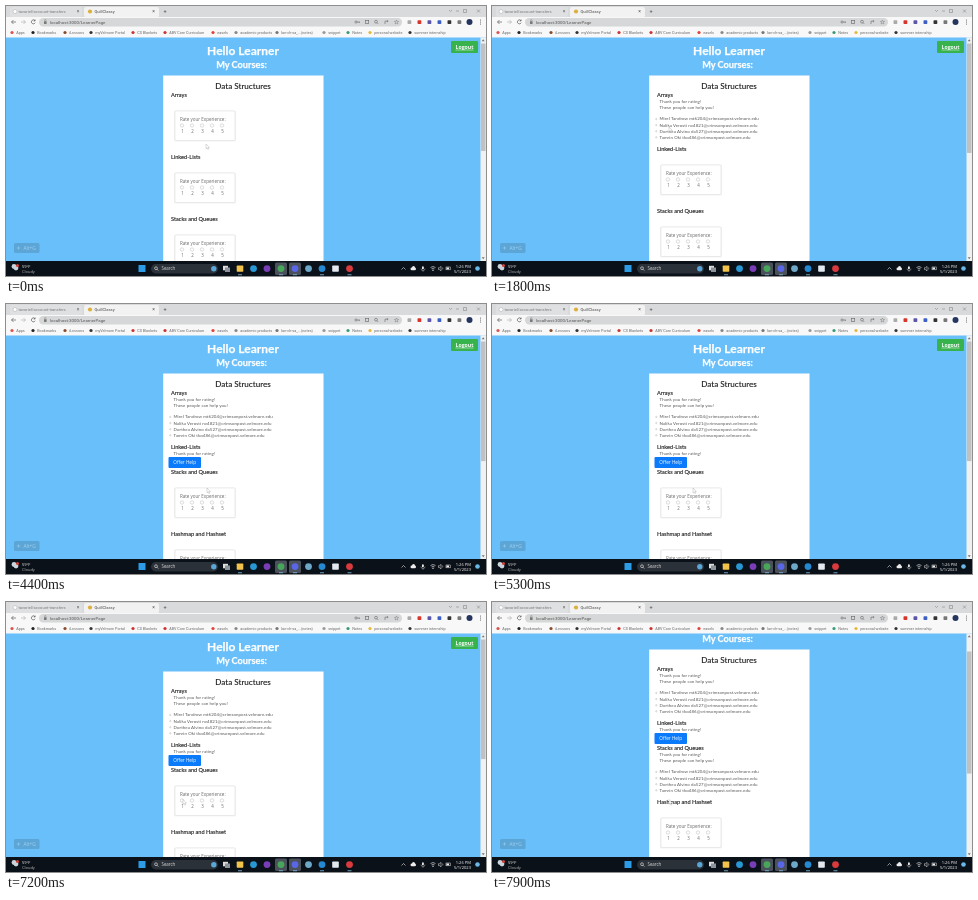
These frames come from a looping animation (480x270 px, 8 s). An HTML page:

```html
<!DOCTYPE html>
<html lang="en">
<head>
<meta charset="utf-8">
<title>Courses</title>
<style>
html, body { margin: 0; width: 100%; height: 100%; overflow: hidden; background: #69bffa; }
svg { display: block; width: 100vw; height: 100vh; }
text { font-family: Lato, "Open Sans", sans-serif; white-space: pre; }
.ui { font-family: "Open Sans", "Noto Sans", sans-serif; }
.bar { font-family: Roboto, "Open Sans", sans-serif; }
.b { font-weight: 700; }
.hero { font-weight: 700; stroke: #fff; stroke-width: .25px; }
.h { font-weight: 500; stroke: #222; stroke-width: .1px; }
.mid { text-anchor: middle; }
.end { text-anchor: end; }
.body { letter-spacing: .08px; }
</style>
</head>
<body>
<svg id="stage" viewBox="0 0 480 270"></svg>
<script>
const LOOP = 8000, VIEW_TOP = 31, VIEW_H = 224;
const stage = document.getElementById('stage');

// y is the vertical middle of the line
const text = (x, y, s, size, fill, cls = '') =>
  `<text x="${x}" y="${y + size * .34}" font-size="${size}" fill="${fill}" class="${cls}">${s}</text>`;
const rect = (x, y, w, h, fill, more = '') =>
  `<rect x="${x}" y="${y}" width="${w}" height="${h}" fill="${fill}" ${more}/>`;
const dot = (x, y, r, fill, more = '') =>
  `<circle cx="${x}" cy="${y}" r="${r}" fill="${fill}" ${more}/>`;
const line = (d, color, width = .6) =>
  `<path d="${d}" fill="none" stroke="${color}" stroke-width="${width}"/>`;

const helpers = [
  'Mirel Tandrow mt6204@crimsonpost.velmore.edu',
  'Nalika Verosti nv4821@crimsonpost.velmore.edu',
  'Dorthea Alvino da527@crimsonpost.velmore.edu',
  'Tamrin Oki tko486@crimsonpost.velmore.edu'
];
const titles = ['Arrays', 'Linked-Lists', 'Stacks and Queues', 'Hashmap and Hashset'];
const heights = { rate: 62, people: 54, offer: 25 };
const grey = '#555';

const bodies = {
  rate: y => rect(168, y + 15.5, 62, 31, '#000', 'rx="1.5" opacity=".05"') +
    rect(169, y + 16, 60, 29.5, '#fff', 'rx="1" stroke="#e0e0e0" stroke-width=".6"') +
    text(174, y + 24, 'Rate your Experience:', 4.5, '#666', 'ui') +
    [1, 2, 3, 4, 5].map(n =>
      dot(166 + n * 10, y + 30.5, 1.7, '#fff', 'stroke="#b4b4b4" stroke-width=".45"') +
      text(166.5 + n * 10, y + 36.5, n, 4.4, '#666', 'ui mid')).join(''),
  people: y => text(167.5, y + 6.5, 'Thank you for rating!', 4.4, grey, 'body') +
    text(167.5, y + 12.5, 'These people can help you!', 4.4, grey, 'body') +
    helpers.map((s, i) =>
      dot(164.3, y + 24 + i * 6.1, .7, '#fff', 'stroke="#999" stroke-width=".35"') +
      text(167.5, y + 24 + i * 6.1, s, 4.4, grey, 'body')).join(''),
  offer: y => text(167.5, y + 6.5, 'Thank you for rating!', 4.4, grey, 'body') +
    rect(162.5, y + 10, 32.5, 11, '#0b7bfb', 'rx="1"') +
    text(178.7, y + 15.3, 'Offer Help', 4.7, '#fff', 'ui mid')
};

function page(kinds) {
  let y = 89;
  let out = text(237, 45, 'Hello Learner', 12, '#fff', 'hero mid') +
    text(235.5, 59, 'My Courses:', 9.2, '#fff', 'hero mid') +
    rect(445, 35, 27, 12, '#37b24d', 'rx="1"') +
    text(458.5, 41, 'Logout', 5.2, '#fff', 'ui b mid') +
    line('M449.5 44h18', '#fff', .5) +
    rect(157.2, 69.5, 160.3, 380, '#fff') +
    text(237, 80, 'Data Structures', 8.1, '#222', 'h mid');
  titles.forEach((title, i) => {
    out += text(165, y, title, 5.6, '#222', 'h') + bodies[kinds[i]](y);
    y += heights[kinds[i]];
  });
  return out;
}

const bookmarks = [
  [6, '#d9534f', 'Apps'], [27, '#222', 'Bookmarks'], [59, '#8a4a2a', 'iLessons'],
  [85, '#333', 'myVelmore Portal'], [127, '#c33', 'CS Blankets'], [159, '#c33', 'ABV Core Curriculum'],
  [207, '#e0433a', 'easels'], [230, '#888', 'academic products'], [271, '#777', 'lan-ch-sa_...(notes)'],
  [318, '#999', 'snippet'], [342, '#3a9a78', 'Notes'], [364, '#e2b93b', 'personal website'],
  [404, '#333', 'summer internship']
];
const extensions = ['#aaa', '#d8342c', '#5a55a8', '#3c5fc4', '#333', '#777'];

const chrome =
  rect(0, 0, 480, 11, '#d9dadc') +
  rect(4, 1, 72, 10, '#dfe0e2', 'rx="2"') +
  rect(78, 1, 75, 10.5, '#f2f2f2', 'rx="2"') +
  dot(9, 5.5, 2, '#fff', 'stroke="#aaa" stroke-width=".5"') +
  text(12.5, 5.5, 'tavoriel/account-transfers', 4.1, '#777', 'bar') +
  text(72, 5.5, '×', 5, '#555', 'bar mid') +
  dot(84, 5.5, 2.1, '#dbb13d') +
  text(88.5, 5.5, 'QuillClassy', 4.1, '#444', 'bar') +
  text(147.5, 5.5, '×', 5, '#444', 'bar mid') + text(159, 5.5, '+', 5.5, '#444', 'bar mid') +
  line('M443 4l1.5 1.5 1.5-1.5M450 5h3M457.5 3.5h3v3h-3zM471 3.5l3 3m0-3l-3 3', '#777', .5) +
  rect(0, 11, 480, 20.5, '#f8f8f8') +
  line('M10 16H5.5m2-2l-2 2 2 2', '#444') + line('M15 16h4.5m-2-2l2 2-2 2', '#aaa') +
  line('M29 14.7a2 2 0 1 0 .2 2m-.1-3.2v1.5h-1.5', '#444') +
  rect(33, 12, 363, 8.5, '#d6d7d8', 'rx="4.2"') +
  rect(38, 15.2, 2.6, 2.8, '#777', 'rx=".4"') + line('M38.6 15.2v-1a.7.7 0 0 1 1.4 0v1', '#777', .45) +
  text(44, 16.2, 'localhost:3000/LearnerPage', 4.4, '#555', 'bar') +
  dot(350, 16, 1.1, 'none', 'stroke="#666" stroke-width=".6"') + line('M351 16h3m-.8 0v1', '#666') +
  rect(359.5, 14.4, 3.2, 3.2, 'none', 'stroke="#666" stroke-width=".6"') +
  dot(370, 15.7, 1.4, 'none', 'stroke="#666" stroke-width=".6"') + line('M371 16.7l1.2 1.2', '#666') +
  line('M379 18v-2.8h3m-1-1.1l1.1 1.1-1.1 1', '#666') +
  line('M390.5 14l.6 1.4 1.5.1-1.1 1 .3 1.5-1.3-.8-1.3.8.3-1.5-1.1-1 1.5-.1z', '#666', .4) +
  extensions.map((c, i) => rect(401.5 + i * 10, 14.2, 3.8, 3.8, c, 'rx=".8"')).join('') +
  dot(463.5, 16, 3, '#25355f') +
  [14, 16, 18].map(y => dot(474.5, y, .5, '#444')).join('') +
  bookmarks.map(([x, c, s]) => dot(x, 26.5, 1.6, c) + text(x + 4.2, 26.5, s, 3.75, '#666', 'bar')).join('');

const apps = [
  [234, '#f2c34b'], [247.5, '#2898d4'], [261, '#7a3db8'], [275, '#48a65a'], [289, '#5966e8'],
  [302.5, '#6da8c9'], [316, '#2489d1'], [329.5, '#e2e8ee'], [343.5, '#d83a3e']
];
const taskbar =
  rect(0, 255, 480, 15, '#0b1118') +
  dot(8, 260.5, 2.4, '#c9d3dc') + dot(10, 262, 2.4, '#c9d3dc') + dot(11.5, 259.5, 1.5, '#d8433a') +
  text(16, 260.2, '59°F', 4, '#fff', 'ui') + text(16, 265.3, 'Cloudy', 4, '#bbb', 'ui') +
  rect(132.5, 259, 7, 7, '#2d9be6') +
  rect(145, 258, 67, 9.5, '#2b3138', 'rx="4.7"') +
  dot(150, 262.2, 1.4, 'none', 'stroke="#eee" stroke-width=".6"') + line('M151 263.2l1.3 1.4', '#eee') +
  text(155.5, 262.8, 'Search', 4.4, '#ddd', 'ui') +
  dot(207.8, 262.7, 2.7, '#5aa6d8') +
  rect(217, 259.8, 5, 4.5, '#ddd') + rect(219, 261.5, 5, 4.5, '#8b949c') +
  [275, 289].map(x => rect(x - 6, 256.5, 12, 12.5, '#4a515b', 'rx="1.5"')).join('') +
  apps.map(([x, c], i) => i == 0 || i == 7
    ? rect(x - 3.3, 259.5, 6.6, 6.2, c, 'rx=".7"')
    : dot(x, 262.6, 3.4, c)).join('') +
  [234, 275, 289, 316, 343.5].map(x => rect(x - 2, 268.4, 4, .8, '#84bde2')).join('') +
  line('M395.5 263.5l2-2 2 2', '#eee') +
  rect(404.5, 261.5, 5.5, 2.8, '#eee', 'rx="1.4"') + dot(407.5, 261.4, 1.5, '#eee') +
  rect(416, 260.3, 1.8, 3, '#eee', 'rx=".9"') + line('M415 262.6a2 2 0 0 0 4 0m-2 2v1.2', '#eee', .4) +
  line('M424.5 261.5q2.5-2 5 0m-4 1.3q1.5-1.2 3 0', '#eee') + dot(427, 264.3, .7, '#eee') +
  line('M432.5 261.7h1l1.5-1.3v4.5l-1.5-1.3h-1zM436.3 261.5q1 1 0 2', '#eee', .5) +
  rect(440, 261, 4.2, 2.8, 'none', 'stroke="#eee" stroke-width=".5"') + rect(440.5, 261.5, 2.5, 1.8, '#eee') +
  text(465, 260.2, '1:26 PM', 4.1, '#fff', 'ui end') + text(465, 265.3, '5/1/2023', 4.1, '#fff', 'ui end') +
  dot(471.5, 262.5, 2.3, '#6bb8e8');

const hint = rect(8, 237, 25.5, 10, '#3c647f', 'rx="1.5" opacity=".28"') +
  line('M10.8 242h3.4M12.5 240.3v3.4', '#a5d2f0', .5) +
  text(17.5, 242, 'Alt+G', 4.9, '#a5d2f0', 'ui');

const scrollbar = rect(474.5, 31.4, 5.5, 223.6, '#f1f1f1') +
  '<path d="M477.2 33.2l1.5 2h-3zM477.2 253.2l1.5-2h-3z" fill="#777"/>' +
  rect(475, 37, 4.5, 107, '#c1c1c1', 'id="thumb"');

stage.innerHTML = rect(0, 0, 480, 270, '#69bffa') + '<g id="page"></g>' +
  scrollbar + hint + chrome + taskbar +
  '<path id="cursor" d="M0 0v4.8l1.1-1 .8 1.8.8-.4-.8-1.7h1.5z" fill="#fff" stroke="#888" stroke-width=".3"/>';

const pageEl = document.getElementById('page');
const thumb = document.getElementById('thumb');
const cursor = document.getElementById('cursor');

// [time, x, y]
const path = [
  [0, 200, 138], [100, 200, 138], [900, 177, 121], [1900, 177, 121], [2700, 205, 172],
  [3900, 205, 172], [4400, 201, 184], [5500, 201, 184], [6200, 174, 189], [6400, 174, 189],
  [6900, 177, 197.5], [LOOP, 177, 197.5]
];

function cursorAt(t) {
  const i = path.findIndex(p => p[0] > t);
  const [t0, x0, y0] = path[i - 1], [t1, x1, y1] = path[i];
  const u = (t - t0) / (t1 - t0), k = u * u * (3 - 2 * u);
  return [x0 + (x1 - x0) * k, y0 + (y1 - y0) * k];
}

let shown = '';
function draw() {
  const t = Math.floor(performance.now() % LOOP / 100) * 100;
  const kinds = [
    t < 1500 ? 'rate' : 'people', t < 4000 ? 'rate' : 'offer',
    t < 7400 ? 'rate' : 'people', 'rate'
  ];
  if (shown !== kinds.join()) {
    shown = kinds.join();
    pageEl.innerHTML = page(kinds);
  }
  const scroll = t < 7900 ? 0 : 22;
  const track = VIEW_H - 12;
  const total = kinds.reduce((sum, k) => sum + heights[k], 194);
  pageEl.setAttribute('transform', `translate(0 ${-scroll})`);
  thumb.setAttribute('y', VIEW_TOP + 6.5 + scroll * track / total);
  thumb.setAttribute('height', track * VIEW_H / total);
  cursor.setAttribute('transform', `translate(${cursorAt(t)})`);
  requestAnimationFrame(draw);
}
draw();
</script>
</body>
</html>
```
